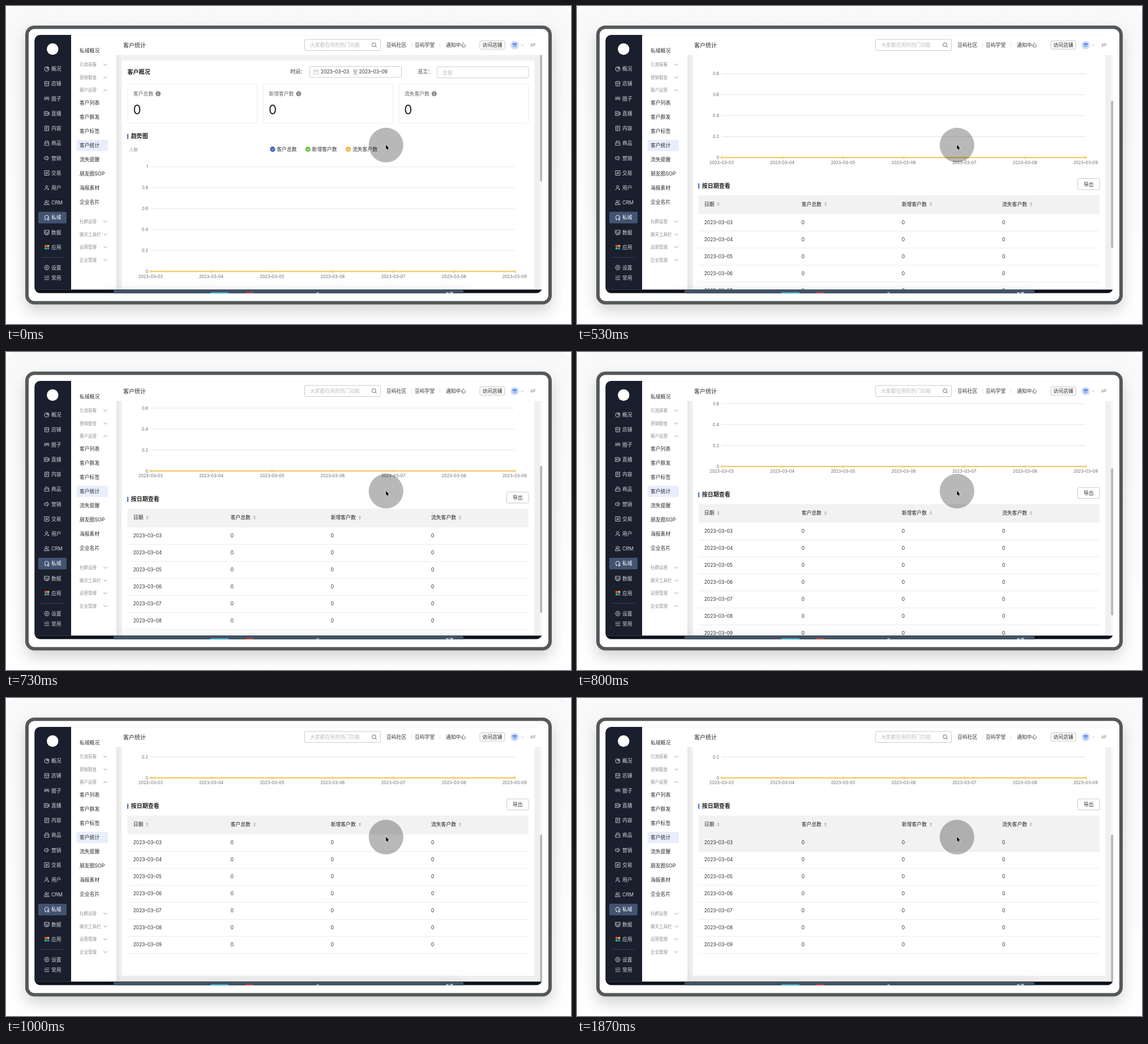
Recreate the animation shown at these times as an HTML page with a canvas. Size 998 px wide and 561 px high, loop 2070 ms.

```html
<!DOCTYPE html>
<html lang="zh-CN">
<head>
<meta charset="utf-8">
<title>客户统计</title>
<style>
html, body { margin: 0; width: 100%; height: 100%; overflow: hidden; background: #fff; }
canvas { display: block; width: 998px; height: 561px; }
</style>
</head>
<body>
<canvas id="stage"></canvas>
<script>
const W = 998, H = 561, LOOP = 2070;
const canvas = document.getElementById('stage');
const ratio = window.devicePixelRatio || 1;
canvas.width = W * ratio;
canvas.height = H * ratio;
const ctx = canvas.getContext('2d');
const FONT = 'Inter, "Noto Sans CJK SC", "Noto Sans CJK", sans-serif';

// [time, value] pairs; each value holds until the next time
const SCROLL = [[0, 0], [400, 0.7], [470, 102], [530, 201], [600, 228], [670, 246.5],
  [730, 258.5], [800, 266.5], [870, 285], [930, 315], [1000, 327.5]];
const HOVER = [[0, 0], [1330, 0.3], [1400, 0.65], [1470, 0.9], [1530, 1]];
const DAYS = [3, 4, 5, 6, 7, 8, 9].map(d => `2023–03–0${d}`);
const METRICS = ['客户总数', '新增客户数', '流失客户数'];

const ICONS = {
  pie: 'M4 0A4 4 0 1 1 0-4V0ZM1.5-4A4 4 0 0 1 4-1.5H1.5Z',
  shop: 'M-3.5-4H3.5L4-1H-4ZM-3.3-1V3.8H3.3V-1M-1 1.5H1',
  group: 'M-1.5-1.5A1.5 1.5 0 1 1 1.5-1.5A1.5 1.5 0 1 1-1.5-1.5M-2.5 3V2A2.5 2 0 0 1 2.5 2V3M-2.5-3A1.3 1.3 0 0 0-3-.4L-4.5 2M2.5-3A1.3 1.3 0 0 1 3-.4L4.5 2',
  live: 'M-4.3-3.5H2V3.5H-4.3ZM2-1L4.3-2.2V2.2L2 1M-2-1.4L0 0L-2 1.4Z',
  doc: 'M-3.5-4H3.5V4H-3.5ZM-1.7-1.8H1.7M-1.7 0H1.7M-1.7 2H.3',
  bag: 'M-3-.5L-2.4-3.8H2.4L3-.5M-4-.5H4V3.6H-4Z',
  horn: 'M-4-1.8H-1.8L1-3.7V3.7L-1.8 1.8H-4ZM2.7-2A3 3 0 0 1 2.7 2',
  trade: 'M-4-4H4V4H-4ZM-2-.7H2L.6-2M2 .9H-2L-.6 2.2',
  user: 'M-2.2-2A2 2 0 1 1 1.8-2A2 2 0 1 1-2.2-2M-4 3.8A4 3.5 0 0 1 0 .8M1 2.5H4M2.5 1V4',
  crm: 'M-3-2.2A1.8 1.8 0 1 1 .6-2.2A1.8 1.8 0 1 1-3-2.2M-4.3 3.6V2.5A3 2.4 0 0 1 1.7 2.5V3.6ZM1.8-4A1.8 1.8 0 0 1 1.8-.5M2.5 1A3 3 0 0 1 4.3 3.6H3',
  domain: 'M-1 3.3A3.7 3.7 0 1 1 3.7-.2M-1 3.3L-3 3.8L-2.6 2.4M1.4 1.7A1.2 1.2 0 1 1 3.6 1.7A1.2 1.2 0 1 1 1.4 1.7M.5 4.2H4.4',
  data: 'M-4.2-3.8H4.2V2.3H-4.2ZM-4-.2L-1.3-1.2L1 .5L4-1.5M-3 4H3',
  gear: 'M-4.4 0L-2.2-3.8H2.2L4.4 0L2.2 3.8H-2.2ZM-1.6 0A1.6 1.6 0 1 1 1.6 0A1.6 1.6 0 1 1-1.6 0',
  list: 'M-.5-3H4.2M-4.2 0H4.2M-4.2 3.2H4.2M-4-3L-3-2L-1.7-3.6',
  down: 'M-3-1.5L0 1.5L3-1.5',
  up: 'M-3 1.5L0-1.5L3 1.5',
  tick: 'M-2 0L-.5 1.5L2.1-1.3',
  calendar: 'M-3.8-3H3.8V3.7H-3.8ZM-3.8-.8H3.8M-1.8-4.2V-2M1.8-4.2V-2',
  search: 'M-4-.7A3.4 3.4 0 1 1 2.8-.7A3.4 3.4 0 1 1-4-.7M1.8 1.8L4.3 4.3',
  swap: 'M-4-1.2H4L1.7-3.2M4 1.2H-4L-1.7 3.2'
};
const NAV = [['概况', 'pie'], ['店铺', 'shop'], ['圈子', 'group'], ['直播', 'live'], ['内容', 'doc'],
  ['商品', 'bag'], ['营销', 'horn'], ['交易', 'trade'], ['用户', 'user'], ['CRM', 'crm'],
  ['私域', 'domain'], ['数据', 'data'], ['应用', 'apps']];
const GROUPS = [['引流获客', 103.5], ['营销裂变', 126], ['客户运营', 148.5], ['社群运营', 380.5],
  ['聊天工具栏', 403], ['运营管理', 425.5], ['企业管理', 448]];
const PAGES = ['客户列表', '客户群发', '客户标签', '客户统计', '流失提醒', '朋友圈SOP', '海报素材', '企业名片'];

function valueAt(steps, t) {
  let v = steps[0][1];
  for (const [time, next] of steps) if (t >= time) v = next;
  return v;
}
function text(str, x, cy, size = 8.8, color = '#333', weight = 400, align = 'left') {
  ctx.font = `${weight} ${size}px ${FONT}`;
  ctx.fillStyle = color;
  ctx.textAlign = align;
  ctx.fillText(str, x, cy + size * 0.37);
}
function rect(x, y, w, h, color) {
  ctx.fillStyle = color;
  ctx.fillRect(x, y, w, h);
}
function round(x, y, w, h, r, fill, stroke) {
  ctx.beginPath();
  ctx.roundRect(x, y, w, h, r);
  if (fill) { ctx.fillStyle = fill; ctx.fill(); }
  if (stroke) { ctx.strokeStyle = stroke; ctx.lineWidth = 0.9; ctx.stroke(); }
}
function dot(x, y, r, fill) {
  ctx.beginPath();
  ctx.arc(x, y, r, 0, Math.PI * 2);
  ctx.fillStyle = fill;
  ctx.fill();
}
function line(x1, y1, x2, y2, color, width = 1) {
  ctx.beginPath();
  ctx.moveTo(x1, y1);
  ctx.lineTo(x2, y2);
  ctx.strokeStyle = color;
  ctx.lineWidth = width;
  ctx.stroke();
}
function icon(name, x, y, color, width = 0.9, scale = 1) {
  ctx.save();
  ctx.translate(x, y);
  ctx.scale(scale, scale);
  ctx.strokeStyle = color;
  ctx.lineWidth = width;
  ctx.stroke(new Path2D(ICONS[name]));
  ctx.restore();
}
function fade(x1, y1, x2, y2, from, to) {
  const g = ctx.createLinearGradient(x1, y1, x2, y2);
  g.addColorStop(0, from);
  g.addColorStop(1, to);
  return g;
}
function shadow(color, blur, dy) {
  ctx.shadowColor = color;
  ctx.shadowBlur = blur * ratio;
  ctx.shadowOffsetY = dy * ratio;
}

function drawDevice() {
  rect(0, 0, W, H, '#fff');
  round(0, 0, W, H + 30, 20, fade(0, 0, 0, H, '#f9f9f9', '#fff'));
  ctx.save();
  shadow('rgba(0,0,0,.16)', 24, 12);
  round(34, 34.5, 930, 492, 16, '#54585b');
  ctx.restore();
  round(40, 40.5, 918, 480, 10, '#fff');
}

function drawNav() {
  rect(50, 51, 65, 449.5, '#1a1f2d');
  dot(82.3, 76, 10.2, '#fff');
  round(57, 363, 50, 20.5, 2, '#435371');
  NAV.forEach(([label, name], i) => {
    const y = 111 + i * 26.22;
    const color = name === 'domain' ? '#fff' : '#d3d6dc';
    if (name === 'apps') {
      ['#f4563c', '#f5b52e', '#35b55c', '#3d83ee'].forEach((c, k) =>
        dot(70 + (k % 2) * 4.4, y - 2.4 + (k >> 1) * 4.4, 2.1, c));
    } else icon(name, 72, y, color);
    text(label, 80, y, 8.8, color);
  });
  line(62, 443.5, 102, 443.5, '#3a4050');
  icon('gear', 72, 461.5, '#d3d6dc');
  text('设置', 80, 461.5, 8.8, '#d3d6dc');
  icon('list', 72, 479.5, '#d3d6dc');
  text('常用', 80, 479.5, 8.8, '#d3d6dc');
}

function drawMenu() {
  rect(115, 51, 80, 449.5, '#fff');
  text('私域概况', 130, 78.5);
  GROUPS.forEach(([label, y], i) => {
    text(label, 130, y, 7.5, '#8c8c8c');
    icon(i === 2 ? 'up' : 'down', 175.5, y, '#8c8c8c', 0.9);
  });
  round(124.5, 236, 55.5, 20, 2, '#e8eefd');
  PAGES.forEach((label, i) => text(label, 130, 171 + i * 25, 8.8, '#2c2c2c'));
}

function drawHeader() {
  rect(195, 51, 753, 35.3, '#fff');
  text('客户统计', 207, 69, 10, '#2c2c2c');
  round(527.5, 59, 134, 19.5, 2, '#fff', '#c4c4c4');
  text('大家都在用的热门功能', 537, 69, 8.8, '#bdbdbd');
  icon('search', 650.5, 69, '#555');
  ['豆屿社区', '豆屿学堂', '通知中心'].forEach((s, i) => text(s, [672, 722, 777][i], 69));
  line(716.5, 65, 716.5, 73, '#e2e2e2');
  line(766.5, 65, 766.5, 73, '#e2e2e2');
  round(837, 61.5, 44, 14.5, 2, '#fff', '#bdbdbd');
  text('访问店铺', 841.3, 69, 8.8, '#222', 500);
  dot(898.5, 69, 7.6, '#d2e2f9');
  round(894.5, 65.5, 8, 3, 1, '#4f8ae8');
  round(895.2, 69, 6.6, 3.6, 0.5, '#8fb5f2');
  icon('down', 912, 69, '#999', 0.9, 0.75);
  icon('swap', 930.7, 68.5, '#777', 0.8);
}

function drawSummary() {
  text('客户概况', 214.5, 116.3, 10, '#222', 700);
  text('时间：', 502.5, 116);
  round(536.5, 106.5, 162, 19.5, 2, '#fff', '#c8c8c8');
  icon('calendar', 547.5, 116.3, '#bbb', 0.8);
  text(DAYS[0], 556, 116.3, 8.45);
  text('至', 612.5, 116.3, 8.8, '#777');
  text(DAYS[6], 623.5, 116.3, 8.45);
  text('员工：', 727.5, 116);
  round(761.5, 107.3, 161.5, 19.5, 2, '#fff', '#c8c8c8');
  text('全部', 771, 117.3, 8.8, '#bdbdbd');
  METRICS.forEach((label, i) => {
    const x = 215 + i * 239.4;
    const ix = x + (i ? 62.5 : 53.7);
    round(x, 137.5, 229, 69.5, 1, '#fff', '#ebebeb');
    text(label, x + 10, 154.7, 8.8, '#666');
    dot(ix, 154.7, 4.5, '#8a8a8a');
    rect(ix - 0.5, 154, 1, 3.2, '#fff');
    rect(ix - 0.5, 152.2, 1, 1.1, '#fff');
    text('0', x + 9.5, 182.3, 22.5, '#222');
  });
}

function section(label, y) {
  rect(214.3, y - 4, 1.8, 9, '#2a5caa');
  text(label, 220.8, y, 10, '#222', 700);
}

function drawChart() {
  section('趋势图', 229.7);
  text('人数', 218, 253, 7.4, '#888');
  const colors = ['#3d62c2', '#73c351', '#f1b840'];
  METRICS.forEach((label, i) => {
    const x = [471, 533.3, 604.7][i];
    dot(x, 252.7, 4.6, colors[i]);
    icon('tick', x, 252.7, '#fff', 1);
    text(label, x + 7.3, 252.5);
  });
  for (let i = 0; i <= 5; i++) {
    const y = 468.3 - i * 36.92;
    if (i) line(255.5, y, 898.5, y, '#e4e6ee', 1.1);
    text(String(i / 5), 251, y, 7.3, '#666', 400, 'right');
  }
  line(255.5, 468.3, 898.5, 468.3, '#f2bd45', 1.7);
  DAYS.forEach((day, i) => {
    const x = 255.5 + i * 107.15;
    dot(x, 468.3, 2.1, '#f0b63a');
    dot(x, 468.3, 1, '#fff');
    text(day, x, 477.3, 7.2, '#666', 400, 'center');
  });
}

function triangle(x, y, dir) {
  ctx.beginPath();
  ctx.moveTo(x - 2.6, y);
  ctx.lineTo(x + 2.6, y);
  ctx.lineTo(x, y + dir * 3);
  ctx.fillStyle = '#bdbdbd';
  ctx.fill();
}

function drawTable(hover) {
  section('按日期查看', 518);
  round(884.5, 505.5, 38.5, 19.5, 2, '#fff', '#c4c4c4');
  text('导出', 895, 515.3);
  rect(214.5, 535, 708.5, 33, '#f2f2f2');
  rect(214.5, 568, 708.5, 30, `rgba(242,242,242,${hover})`);
  const cols = [224.7, 396.7, 573.7, 751];
  ['日期', ...METRICS].forEach((label, i) => {
    const sx = [249.5, 439, 625, 802][i];
    text(label, cols[i], 550.5, 8.8, '#222', 500);
    triangle(sx, 550, -1);
    triangle(sx, 551.3, 1);
  });
  DAYS.forEach((day, r) => {
    const y = 582.7 + r * 30;
    text(day, cols[0], y, 8.45);
    for (let c = 1; c < 4; c++) text('0', cols[c] - 0.3, y, 8.8);
    line(214.5, y + 15.3, 923, y + 15.3, '#ececec');
  });
}

function drawContent(scroll, hover) {
  ctx.save();
  ctx.beginPath();
  ctx.rect(195, 86.3, 753, 414.2);
  ctx.clip();
  rect(195, 86, 748, 415, '#f0f0f0');
  rect(195, 86, 10, 415, fade(195, 0, 204, 0, '#e6e6e6', '#f1f1f1'));
  rect(943, 86, 5, 415, '#f8f8f8');
  ctx.translate(0, -scroll);
  rect(204.7, 96, 728.6, 721.5, '#fff');
  drawSummary();
  drawChart();
  drawTable(hover);
  ctx.translate(0, scroll);
  round(943.2, 50 + scroll * 0.583, 4.6, 259.5, 2.3, '#b8b8b8');
  ctx.restore();
}

function drawDock() {
  ctx.save();
  ctx.beginPath();
  ctx.rect(115, 470, 833, 37);
  ctx.clip();
  shadow('rgba(0,0,0,.12)', 18, 0);
  rect(192, 501, 615, 8, '#3f5163');
  ctx.restore();
  rect(50, 500.3, 898, 7, '#0c121c');
  round(190, 500.3, 618, 12, [3, 3, 0, 0], '#415264');
  round(360, 505, 34, 6, 3, '#3cc6e0');
  round(422, 504.8, 16, 6, 3, '#d8453f');
  round(548, 505, 5, 4, 2, '#c9d0d6');
  round(777, 505, 5, 4, 1, '#d5dade');
  round(784, 504.6, 6, 4, 2, '#d5dade');
}

function drawPointer() {
  dot(671.2, 245.4, 30.6, 'rgba(0,0,0,.28)');
  const arrow = new Path2D('M671.2 244.8V253L673 251.4L674.3 254.2L675.6 253.6L674.4 250.9H676.6Z');
  ctx.strokeStyle = 'rgba(255,255,255,.75)';
  ctx.lineWidth = 1.2;
  ctx.stroke(arrow);
  ctx.fillStyle = '#000';
  ctx.fill(arrow);
}

function draw(t) {
  ctx.setTransform(ratio, 0, 0, ratio, 0, 0);
  drawDevice();
  ctx.save();
  ctx.beginPath();
  ctx.roundRect(50.3, 51, 896.9, 455.5, 10);
  ctx.clip();
  drawContent(valueAt(SCROLL, t), valueAt(HOVER, t));
  drawHeader();
  drawMenu();
  drawNav();
  line(115, 51.2, 948, 51.2, '#ececec', 0.8);
  drawDock();
  ctx.restore();
  drawPointer();
}

const start = performance.now();
function tick() {
  draw((performance.now() - start) % LOOP);
  requestAnimationFrame(tick);
}
tick();
</script>
</body>
</html>
```
